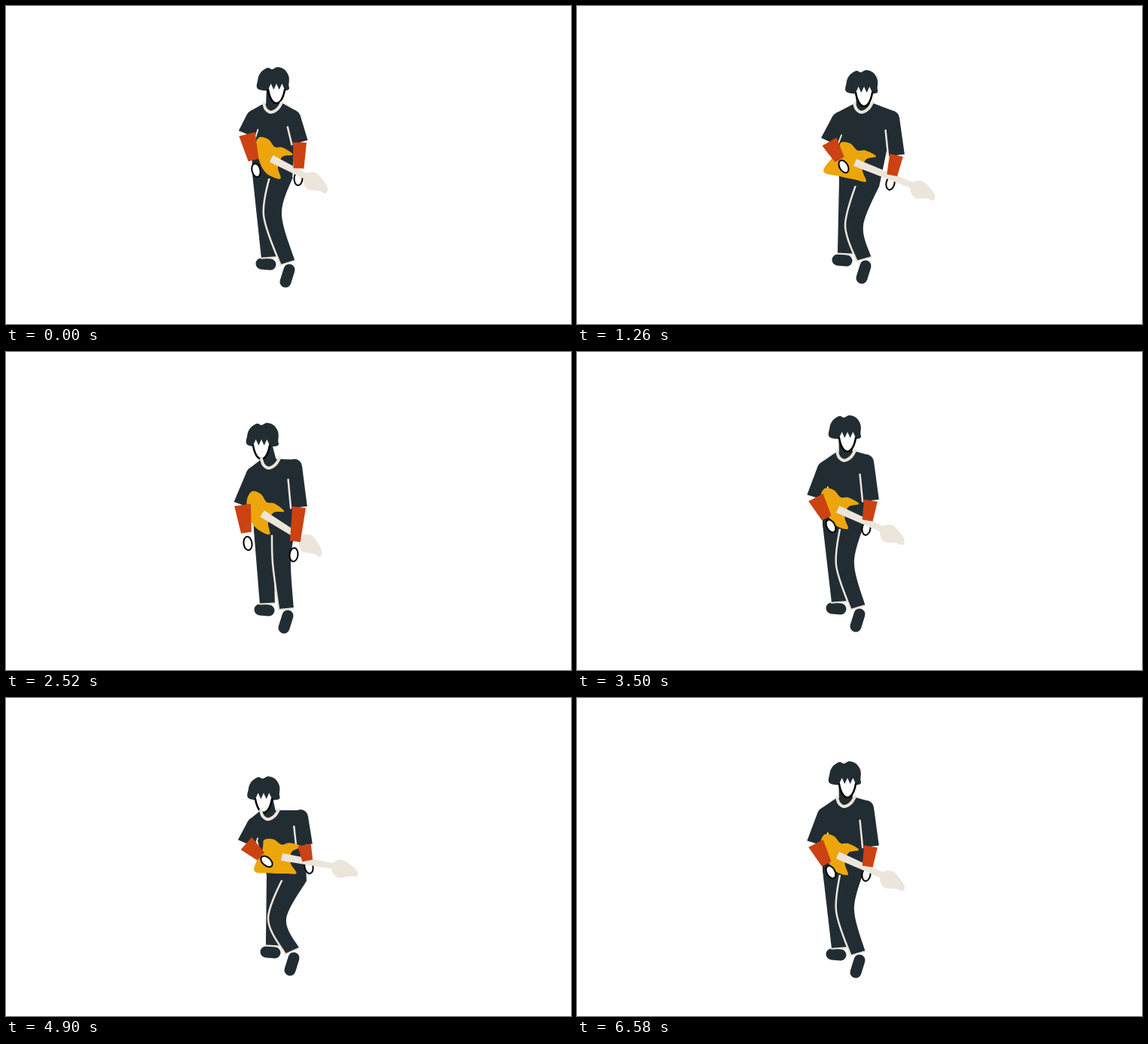
Animation, 750 px wide and 422 px high, one loop 6720 ms. Source, as an HTML page with a canvas:

```html
<!DOCTYPE html>
<html lang="en">
<head>
<meta charset="utf-8">
<title>Guitarist</title>
<style>
  html, body { margin: 0; width: 100%; height: 100%; overflow: hidden; background: #fff; }
  canvas { display: block; }
</style>
</head>
<body>
<canvas id="stage" width="750" height="422"></canvas>
<script>
const ctx = document.getElementById('stage').getContext('2d');
ctx.lineCap = ctx.lineJoin = 'round';

const DARK = '#222d33', RED = '#cb4213', GOLD = '#eca60b', CREAM = '#ece5dc';
const STEP = 140, LAST = 12;

// Joint positions at these steps; the steps between are blended.
const KEYS = [0, 1, 6, 9, 11];
const joints = {
  chin:      '359,129 359,132 339,142 381,133 342,152',
  neck:      '354,132 357,135 351,145 380,132 350,152',
  shoulderL: '329,148 329,155 329,162 348,151 330,168',
  elbowL:    '320,170 317,193 314,203 335,180 319,193',
  handL:     '332,218 337,231 321,254 354,213 346,217',
  shoulderR: '381,148 384,146 383,152 418,149 391,158',
  elbowR:    '390,181 390,197 389,206 424,198 396,195',
  handR:     '388,229 384,234 382,269 416,235 402,224',
  hip:       '353,222 352,228 355,236 374,232 372,235',
  knee:      '354,277 356,282 366,280 368,291 360,293',
  ankle:     '374,341 373,339 372,341 381,336 380,336',
  bridge:    '353,203 347,209 341,215 370,208 367,211',
  nut:       '398,226 405,235 392,247 445,238 434,223'
};
const toPoints = text => text.split(' ').map(pair => pair.split(',').map(Number));
for (const name in joints) joints[name] = toPoints(joints[name]);

const HAIR = toPoints('-19,12 -21,-1 -17,-11 -8,-17 -2,-15 5,-18 14,-15 20,-6 20,5 17,13');
const PEGHEAD = toPoints('-1,-4 9,-10 18,-8 32,0 34,8 25,9 10,14 0,7');
const BODY = toPoints('-28,-5 -28,-18 -16,-21 -4,-16 6,-20 22,-18 11,-9 12,6 22,18 8,21');

const shift = ([x, y], dx, dy) => [x + dx, y + dy];
const mix = (a, b, k) => [a[0] + (b[0] - a[0]) * k, a[1] + (b[1] - a[1]) * k];

function fill(color) {
  ctx.fillStyle = color;
  ctx.fill();
}

function stroke(color, width) {
  ctx.strokeStyle = color;
  ctx.lineWidth = width;
  ctx.stroke();
}

function polygon(points, color) {
  ctx.beginPath();
  for (const p of points) ctx.lineTo(...p);
  fill(color);
}

// Adds a smooth curve through the points to the current path.
function spline(points, closed) {
  const n = points.length;
  const at = i => points[closed ? (i + n) % n : Math.max(0, Math.min(n - 1, i))];
  ctx.lineTo(...points[0]);
  for (let i = 0; i < (closed ? n : n - 1); i++) {
    const [a, b, c, d] = [at(i - 1), at(i), at(i + 1), at(i + 2)];
    ctx.bezierCurveTo(b[0] + (c[0] - a[0]) / 6, b[1] + (c[1] - a[1]) / 6,
      c[0] - (d[0] - b[0]) / 6, c[1] - (d[1] - b[1]) / 6, ...c);
  }
}

function blob(points, color) {
  ctx.beginPath();
  spline(points, true);
  fill(color);
}

function line(points, color, width) {
  ctx.beginPath();
  spline(points);
  stroke(color, width);
}

// Fills a limb with the given half widths and returns its two sides.
function limb(points, widths, color) {
  const side = sign => points.map((p, i) => {
    const a = points[Math.max(0, i - 1)], b = points[Math.min(points.length - 1, i + 1)];
    const [dx, dy] = [b[0] - a[0], b[1] - a[1]];
    const k = sign * widths[i] / Math.hypot(dx, dy);
    return shift(p, -dy * k, dx * k);
  });
  const left = side(1), right = side(-1);
  ctx.beginPath();
  spline(left);
  spline([...right].reverse());
  fill(color);
  return { left, right };
}

function leg(points, widths, toe) {
  const { left, right } = limb(points, widths, DARK);
  const ankle = points.at(-1);
  line([shift(ankle, 2, 9), shift(ankle, ...toe)], DARK, 15);
  line([left.at(-1), right.at(-1)], CREAM, 2);
  return left;
}

function sleeve(shoulder, elbow, width) {
  ctx.beginPath();
  ctx.arc(...shoulder, 10, 0, 7);
  fill(DARK);
  return limb([shoulder, elbow], [10, width], DARK);
}

function hand(elbow, at) {
  const angle = Math.atan2(at[1] - elbow[1], at[0] - elbow[0]);
  ctx.beginPath();
  ctx.ellipse(...at, 9, 5.5, angle, 0, 7);
  fill('#fff');
  stroke('#000', 2);
}

const forearm = (elbow, at, width) => limb([elbow, mix(elbow, at, .72)], [width, 7], RED);

function drawLegs({ hip, knee, ankle }) {
  leg([shift(hip, -13, 0), shift(ankle, -25, -7)], [13, 10], [-10, 8]);
  const seam = leg([shift(hip, 13, 2), knee, ankle], [15, 12, 10], [-3, 25]);
  line(seam, CREAM, 2.5);
}

function drawTorso({ neck, shoulderL, elbowL, shoulderR, elbowR, hip }) {
  polygon([shift(neck, -13, -2), shift(shoulderL, -4, -9), shift(hip, -26, 0), shift(hip, -25, 6),
    shift(hip, 27, 8), shift(shoulderR, 4, -9), shift(neck, 13, -3)], DARK);
  const [topL, cuffL] = sleeve(shoulderL, elbowL, 12).right;
  const [topR, cuffR] = sleeve(shoulderR, elbowR, 11).left;
  line([mix(cuffL, topL, .45), cuffL], CREAM, 2);
  line([mix(cuffR, topR, .7), cuffR], CREAM, 2.5);
}

function drawHead({ chin, neck }) {
  const turn = neck[0] - chin[0];
  const head = shift(chin, -2 + turn * .35, -30);
  limb([head, shift(neck, 0, 4)], [9, 9], DARK);
  blob(HAIR.map(p => shift(head, ...p)), DARK);

  ctx.save();
  ctx.translate(...chin);
  const jaw = [-7, 6, 7, 6, 11, -18];
  ctx.beginPath();
  ctx.moveTo(-11, -18);
  ctx.bezierCurveTo(...jaw);
  for (let i = 1; i < 6; i++) ctx.lineTo(11 - 22 * i / 6, i % 2 ? -26 : -18);
  fill('#fff');
  ctx.beginPath();
  ctx.moveTo(-11, -18);
  ctx.bezierCurveTo(...jaw);
  stroke('#000', 2.5);
  ctx.restore();

  line([[-12, -3], [-9, 5], [-2, 9], [7, 4], [12, -4]].map(p => shift(neck, ...p)), CREAM, 4);
}

function drawGuitar({ bridge, nut, hip, elbowL, handL, elbowR, handR }) {
  const [dx, dy] = [nut[0] - bridge[0], nut[1] - bridge[1]];
  const inFrame = paint => {
    ctx.save();
    ctx.translate(...bridge);
    ctx.rotate(Math.atan2(dy, dx));
    paint();
    ctx.restore();
  };
  // The lower bout widens as the hip swings to the right.
  const swing = (hip[0] - 352) / 20;
  const bout = [[-4 - 9 * swing, 17 + 7 * swing], [-16 - 18 * swing, 6 + 18 * swing]];
  inFrame(() => blob([...BODY, ...bout], GOLD));
  hand(elbowL, handL);
  forearm(elbowL, handL, 11);
  hand(elbowR, handR);
  inFrame(() => {
    const length = Math.hypot(dx, dy);
    polygon([[-1, -5], [length + 2, -4], [length + 2, 4], [-1, 5]], CREAM);
    blob(PEGHEAD.map(p => shift(p, length, 0)), CREAM);
  });
  forearm(elbowR, handR, 9);
}

function poseAt(step) {
  let key = 0;
  while (key < KEYS.length - 2 && step >= KEYS[key + 1]) key++;
  const k = Math.min(1.2, (step - KEYS[key]) / (KEYS[key + 1] - KEYS[key]));
  const pose = {};
  for (const name in joints) pose[name] = mix(joints[name][key], joints[name][key + 1], k);
  return pose;
}

// The steps run forwards to the last pose and back again.
function tick() {
  const step = Math.floor(performance.now() / STEP) % (2 * LAST);
  const pose = poseAt(LAST - Math.abs(LAST - step));
  ctx.fillStyle = '#fff';
  ctx.fillRect(0, 0, 750, 422);
  drawLegs(pose);
  drawTorso(pose);
  drawHead(pose);
  drawGuitar(pose);
  requestAnimationFrame(tick);
}
tick();
</script>
</body>
</html>
```
